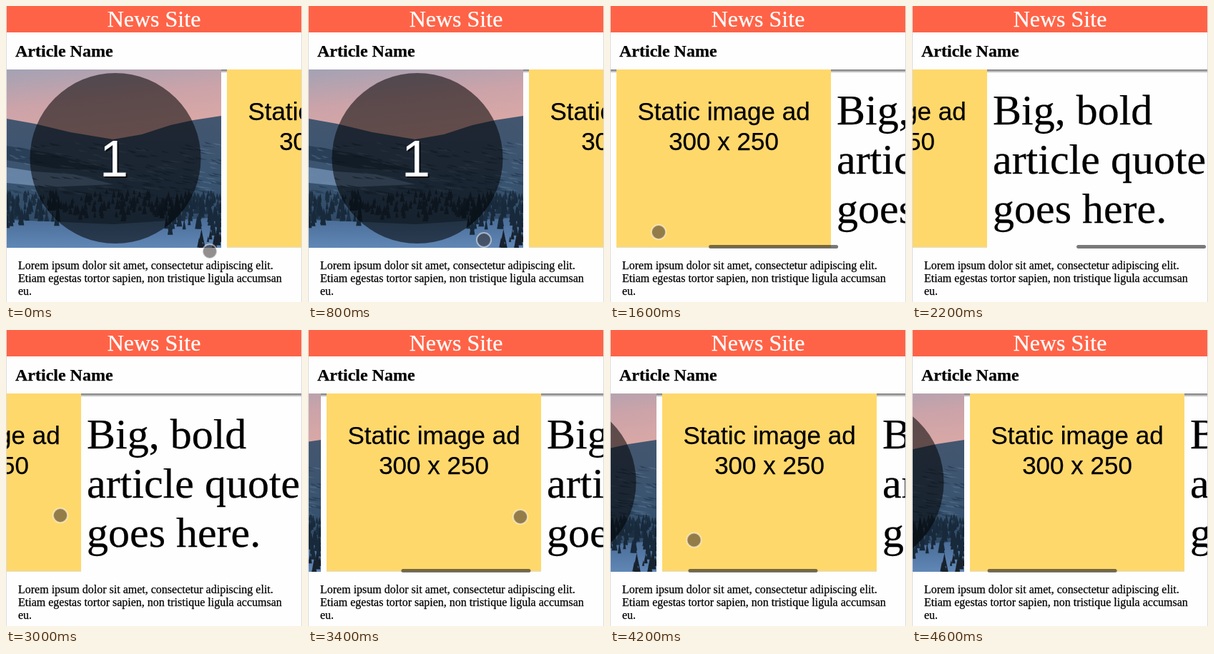
An HTML page that plays this animation: 414 px wide and 415 px high, repeating every 4800 ms.

```html
<!DOCTYPE html>
<html lang="en">
<head>
<meta charset="utf-8">
<title>News Site</title>
<style>
  html, body { margin: 0; width: 100%; height: 100%; overflow: hidden; background: #fdfefd; }
  svg { display: block; width: 414px; height: 415px; }
  text {
    font-family: "Liberation Serif", "Times New Roman", serif;
    fill: currentColor; stroke: currentColor; stroke-width: .25px;
  }
  .sans { font-family: "Liberation Sans", Arial, sans-serif; text-anchor: middle; }
  .ad { font-size: 35px; }
  .digit { font-size: 72px; stroke: none; }
  .quote { font-size: 60px; }
  .body { font-size: 16px; }
  .white { color: #fff; }
</style>
</head>
<body>
<svg viewBox="0 0 414 415">
  <defs>
    <linearGradient id="sky" x2=".3" y2="1">
      <stop offset="0" stop-color="#a3a2b4"/>
      <stop offset=".45" stop-color="#cba3a9"/>
      <stop offset="1" stop-color="#dfaaa4"/>
    </linearGradient>
    <linearGradient id="hill" x2="0" y2="1">
      <stop offset="0" stop-color="#44566f"/>
      <stop offset=".5" stop-color="#38536f"/>
      <stop offset="1" stop-color="#2b4560"/>
    </linearGradient>
    <linearGradient id="snow" x2="0" y2="1">
      <stop offset="0" stop-color="#4a6c96"/>
      <stop offset="1" stop-color="#6087b6"/>
    </linearGradient>
    <linearGradient id="shade" x2="0" y2="1">
      <stop offset="0" stop-color="#777"/>
      <stop offset=".4" stop-color="#a0a0a0"/>
      <stop offset="1" stop-color="#fdfefd"/>
    </linearGradient>
    <clipPath id="view"><rect x="1" y="88" width="412" height="252"/></clipPath>
    <clipPath id="frame"><rect x="1" y="89" width="300" height="250"/></clipPath>
  </defs>

  <rect width="414" height="415" fill="#fdfefd"/>
  <path d="M.5 0V415M413.5 0V415" stroke="#ddd"/>
  <rect x="1" width="412" height="37" fill="#ff6347"/>
  <text class="white" x="207" y="29" font-size="32" text-anchor="middle">News Site</text>
  <text x="13" y="71" font-size="24" font-weight="bold">Article Name</text>
  <rect x="1" y="89" width="412" height="5" fill="url(#shade)"/>

  <g clip-path="url(#view)">
    <g id="strip">
      <g clip-path="url(#frame)">
        <rect x="1" y="89" width="300" height="110" fill="url(#sky)"/>
        <path d="M1 158 40 165 90 177 150 187 190 180 230 167 262 160 301 154V345H1Z" fill="url(#hill)"/>
        <path d="M1 196 60 206 150 230 70 228 1 216Z" fill="#293f57"/>
        <path d="M1 226 40 232 95 236 150 250 60 254 1 248Z" fill="#6683a5"/>
        <path d="M1 300 60 302 150 306 301 296V339H1Z" fill="url(#snow)"/>
        <g id="specks"/>
        <circle cx="153" cy="213.5" r="119.5" opacity=".55"/>
        <text class="sans digit" x="153" y="241" opacity=".7">1</text>
        <text class="sans digit white" x="151" y="239">1</text>
      </g>
      <rect x="309" y="89" width="300" height="249" fill="#ffd86c"/>
      <path d="M309 338.5H609" stroke="#ddd"/>
      <text class="sans ad" x="459" y="159.5">Static image ad</text>
      <text class="sans ad" x="459" y="201.5">300 x 250</text>
      <text class="quote" x="617" y="165.5">Big, bold</text>
      <text class="quote" x="617" y="234.5">article quote</text>
      <text class="quote" x="617" y="303.5">goes here.</text>
    </g>
  </g>
  <rect id="bar" y="335" width="181" height="5" rx="2.5"/>

  <text class="body" x="17" y="369">Lorem ipsum dolor sit amet, consectetur adipiscing elit.</text>
  <text class="body" x="17" y="387">Etiam egestas tortor sapien, non tristique ligula accumsan</text>
  <text class="body" x="17" y="405">eu.</text>
  <circle id="touch" r="10" fill="#302828" fill-opacity=".52" stroke="#fff" stroke-opacity=".5" stroke-width="2"/>
</svg>
<script>
  const $ = id => document.getElementById(id);
  const LOOP = 4800, STEP = 200, AWAY = -40;
  const clamp = v => Math.min(1, Math.max(0, v));

  // swipes that move the strip; times count in steps
  const swipes = [
    { start: 4, end: 9, by: 304 },
    { start: 10, end: 11, by: 200 },
    { start: 15, end: 17, by: -221 },
    { start: 20, end: 22, by: -55 }
  ];

  // waypoints of the finger: time, x, y
  const path = [
    [0, 285, 344], [3, 190, 349], [4, 246, 328], [6, 23, 319], [8, 68, 317],
    [10, 245, 309], [11, -11, 300], [13, AWAY, 300], [14, 66, 260], [15, 76, 260],
    [17, 297, 262], [18, 297, 262], [20, 151, 263], [22, 84, 326], [23, AWAY, 326]
  ];

  const glide = p => 1 - (1 - clamp(p)) ** 2.7;

  const scrollAt = t => swipes.reduce(
    (sum, s) => sum + s.by * glide((t - s.start) / (s.end - s.start)), 0);

  // the scrollbar lingers for one step after a swipe, then fades out
  function barAt(t) {
    const last = swipes.findLast(s => s.start < t);
    return last ? .52 * clamp((last.end + 3 - t) / 2) : 0;
  }

  function fingerAt(t) {
    const i = path.findLastIndex(p => p[0] <= t);
    const a = path[i], b = path[i + 1] || a;
    const p = (t - a[0]) / (b[0] - a[0] || 1);
    return [a[1] + (b[1] - a[1]) * p, a[2] + (b[2] - a[2]) * p];
  }

  let seed = 7;
  const rand = () => (seed = seed * 16807 % 2147483647) / 2147483647;

  function scatter(count, left, right, top, bottom, color, shape) {
    let d = "";
    for (let i = 0; i < count; i++) {
      const x = left + rand() * (right - left), y = top + rand() * (bottom - top);
      d += `M${x} ${y}${shape(.4 + rand() * .6)}`;
    }
    const specks = document.createElementNS("http://www.w3.org/2000/svg", "path");
    specks.setAttribute("d", d);
    specks.setAttribute("fill", color);
    $("specks").append(specks);
  }
  const streak = size => `l${size * 14} 2l${size * 10} 2l${-size * 18} -1z`;
  const tree = height => size => `l${size * 4} ${size * height}h${-size * 8}z`;

  scatter(90, 1, 301, 190, 262, "#7089a655", streak);
  scatter(120, 1, 301, 190, 270, "#1b2f4588", streak);
  scatter(230, 1, 301, 256, 288, "#1c2f42", tree(16));
  scatter(40, 1, 75, 262, 290, "#17293a", tree(24));
  scatter(80, 215, 301, 260, 300, "#17293a", tree(24));
  scatter(16, 270, 301, 312, 335, "#17222e", tree(20));

  function draw(now) {
    const t = Math.floor(now % LOOP / STEP);
    const scroll = scrollAt(t);
    $("strip").setAttribute("transform", `translate(${-Math.round(scroll)})`);
    $("touch").setAttribute("transform", `translate(${fingerAt(t)})`);
    $("bar").setAttribute("x", 2.8 + scroll * .451);
    $("bar").setAttribute("opacity", barAt(t));
    requestAnimationFrame(draw);
  }
  draw(0);
</script>
</body>
</html>
```
